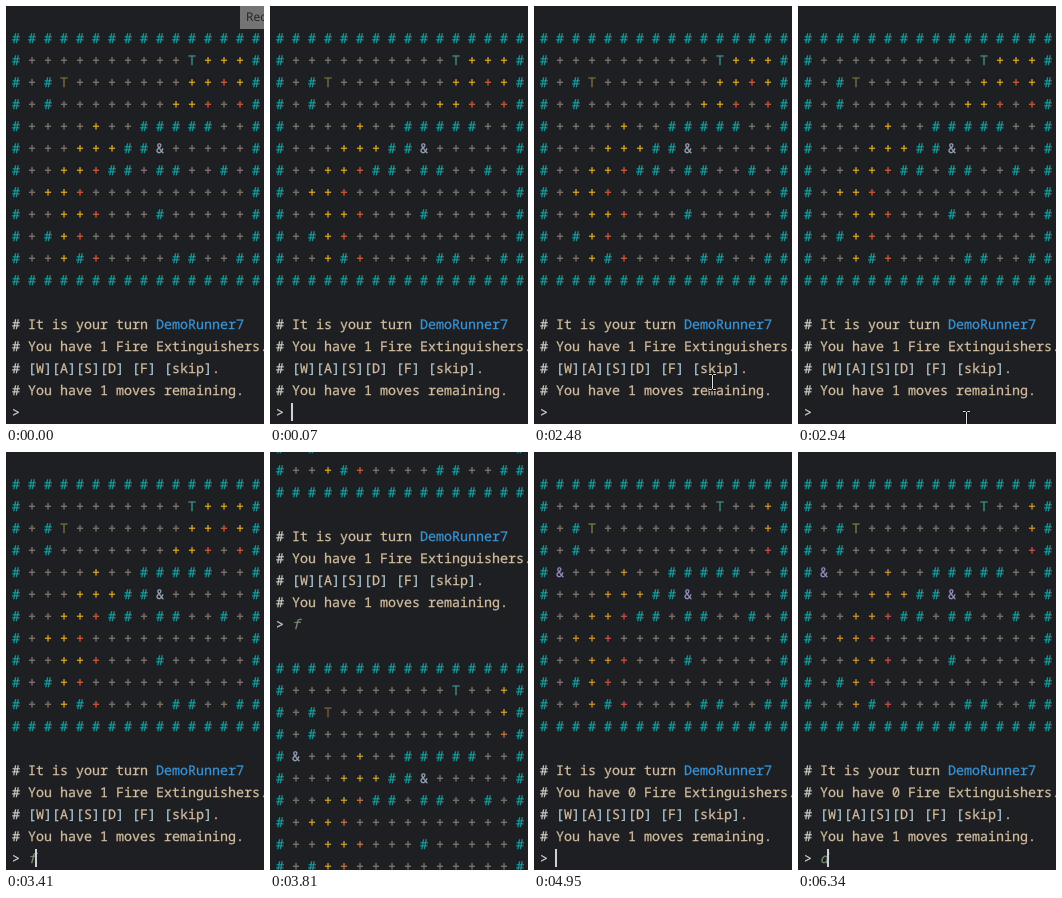
An HTML page for the animation above (6680 ms loop, 258x418 px).

```html
<!DOCTYPE html>
<html lang="en">
<head>
<meta charset="utf-8">
<title>Terminal fire game</title>
<style>
html, body { margin: 0; width: 100%; height: 100%; overflow: hidden; background: #1e1f22; }
svg { display: block; width: 258px; height: 418px; }
text {
  font: 500 13.333px "Noto Sans Mono", "DejaVu Sans Mono", monospace;
  white-space: pre;
  text-rendering: geometricPrecision;
}
text, tspan { fill: currentColor; stroke: currentColor; stroke-width: .25px; }
.wall { color: #169fa1; }
.grass { color: #877c71; }
.fire { color: #e8b020; }
.ember { color: #e05c3a; }
.tree { color: #3f9088; }
.shrub { color: #7a7038; }
.person { color: #98a3b4; }
.later .fire { color: #dc9a28; }
.later .ember { color: #cf5546; }
.later .tree { color: #3f9279; }
.later .shrub { color: #79803f; }
.later .person { color: #968fbd; }
.scrolling .shrub { color: #7d5c3c; }
.scrolling .ember { color: #d27a4a; }
.scrolling .fire { color: #dcaa2c; }
.scrolling .tree { color: #3f9088; }
.plain { color: #d2bd9f; }
.mark { color: #d0cdc7; }
.bracket { color: #b4c9d4; }
.name { color: #3993d4; }
.input { color: #788a72; font-style: italic; }
.tip text { font: 12px "Open Sans", sans-serif; color: #222325; stroke: none; }
</style>
</head>
<body>
<svg viewBox="0 0 258 418">
  <rect width="258" height="418" fill="#1e1f22"/>
  <g id="console"></g>
  <rect id="caret" y="397" width="2" height="18" fill="#ced0d6"/>
  <g id="beam" fill="none">
    <path d="M-3.5-7.5h2.5l1 1 1-1h2.5M0-6.5v13M-3.5 7.5h2.5l1-1 1 1h2.5" stroke="#101113" stroke-width="3"/>
    <path d="M-3.5-7.5h2.5l1 1 1-1h2.5M0-6.5v13M-3.5 7.5h2.5l1-1 1 1h2.5" stroke="#e4e4e4"/>
  </g>
  <g id="tip" class="tip">
    <rect x="234" width="24" height="23" fill="#747475"/>
    <text x="240" y="15">Rec</text>
  </g>
</svg>
<script>
const LOOP = 6680, LEFT = 6, CHAR = 8, LINE = 22, BASELINE = 37, SCREEN_HEIGHT = 19 * LINE;
const $ = id => document.getElementById(id);

const TILES = {
  '#': ['#', 'wall'], '+': ['+', 'grass'], y: ['+', 'fire'], r: ['+', 'ember'],
  T: ['T', 'tree'], t: ['T', 'shrub'], '&': ['&', 'person']
};
const EDGE = '#'.repeat(16);
const LOWER = ['#+++yyy##&+++++#', '#++yyr##+##++#+#', '#+yyr++++++++++#', '#++yyr+++#+++++#',
  '#+#yr++++++++++#', '#++y#r++++##++##', EDGE];
const BURNING = [EDGE, '#++++++++++Tyyy#', '#+#t+++++++yyry#', '#+#+++++++yyr+r#', '#++++y++#####++#', ...LOWER];
const DOUSED = [EDGE, '#++++++++++T++y#', '#+#t++++++++++y#', '#+#+++++++++++r#', '#&+++y++#####++#', ...LOWER];

function element(tag, attributes, parent, content = '') {
  const node = document.createElementNS('http://www.w3.org/2000/svg', tag);
  for (const key in attributes) node.setAttribute(key, attributes[key]);
  node.textContent = content;
  return parent.appendChild(node);
}

function write(parent, row, column, content, style) {
  return element('text', { x: LEFT + column * CHAR, y: BASELINE + row * LINE, class: style }, parent, content);
}

function buildScreen(map, extinguishers, top) {
  const group = element('g', { transform: `translate(0 ${top})` }, $('console'));
  map.forEach((line, row) => [...line].forEach((tile, column) =>
    write(group, row, column * 2, ...TILES[tile])));
  const messages = ['It is your turn ', `You have ${extinguishers} Fire Extinguishers.`,
    '[W][A][S][D] [F] [skip].', 'You have 1 moves remaining.'];
  messages.forEach((message, i) => {
    write(group, 13 + i, 0, '#', 'mark');
    const line = write(group, 13 + i, 2, '', 'plain');
    for (const part of message.split(/([[\]])/)) {
      element('tspan', { class: /[[\]]/.test(part) ? 'bracket' : 'plain' }, line, part);
    }
  });
  write(group, 13, 18, 'DemoRunner7', 'name');
  write(group, 17, 0, '>', 'mark');
  return { group, input: write(group, 17, 2, '', 'input') };
}

const first = buildScreen(BURNING, 1, 0);
const second = buildScreen(DOUSED, 0, SCREEN_HEIGHT);

// Steps are [start time, value], in order; the last one reached holds.
const at = (steps, t) => steps.findLast(([start]) => t >= start)[1];
const scrollSteps = [[0, 0], [3810, 234], [3880, SCREEN_HEIGHT]];
const caretSteps = [[0, null], [70, 21], [270, null], [3200, 21], [3410, 29], [3810, null],
  [3880, 21], [4480, null], [4950, 21], [5480, null], [6000, 21], [6340, 29]];
const beamSteps = [[0, null], [2480, [178, 376]], [2550, [167, 390]], [2610, [147, 411]], [2680, null],
  [2940, [168, 413]], [3010, [163, 416]], [3080, null]];

function show(node, visible) {
  node.style.display = visible ? '' : 'none';
}

function render(t) {
  const scroll = at(scrollSteps, t), caret = at(caretSteps, t), beam = at(beamSteps, t);
  $('console').setAttribute('transform', `translate(0 ${-scroll})`);
  second.group.setAttribute('class', t < 3880 ? 'scrolling' : 'later');
  first.input.textContent = t >= 3410 ? 'f' : '';
  second.input.textContent = t >= 6340 ? 'd' : '';
  show($('caret'), caret !== null);
  if (caret !== null) $('caret').setAttribute('x', caret);
  show($('beam'), beam);
  if (beam) $('beam').setAttribute('transform', `translate(${beam[0] + .5} ${beam[1]})`);
  show($('tip'), t < 70);
}

const begun = performance.now();
function tick() {
  render((performance.now() - begun) % LOOP);
  requestAnimationFrame(tick);
}
tick();
</script>
</body>
</html>
```
